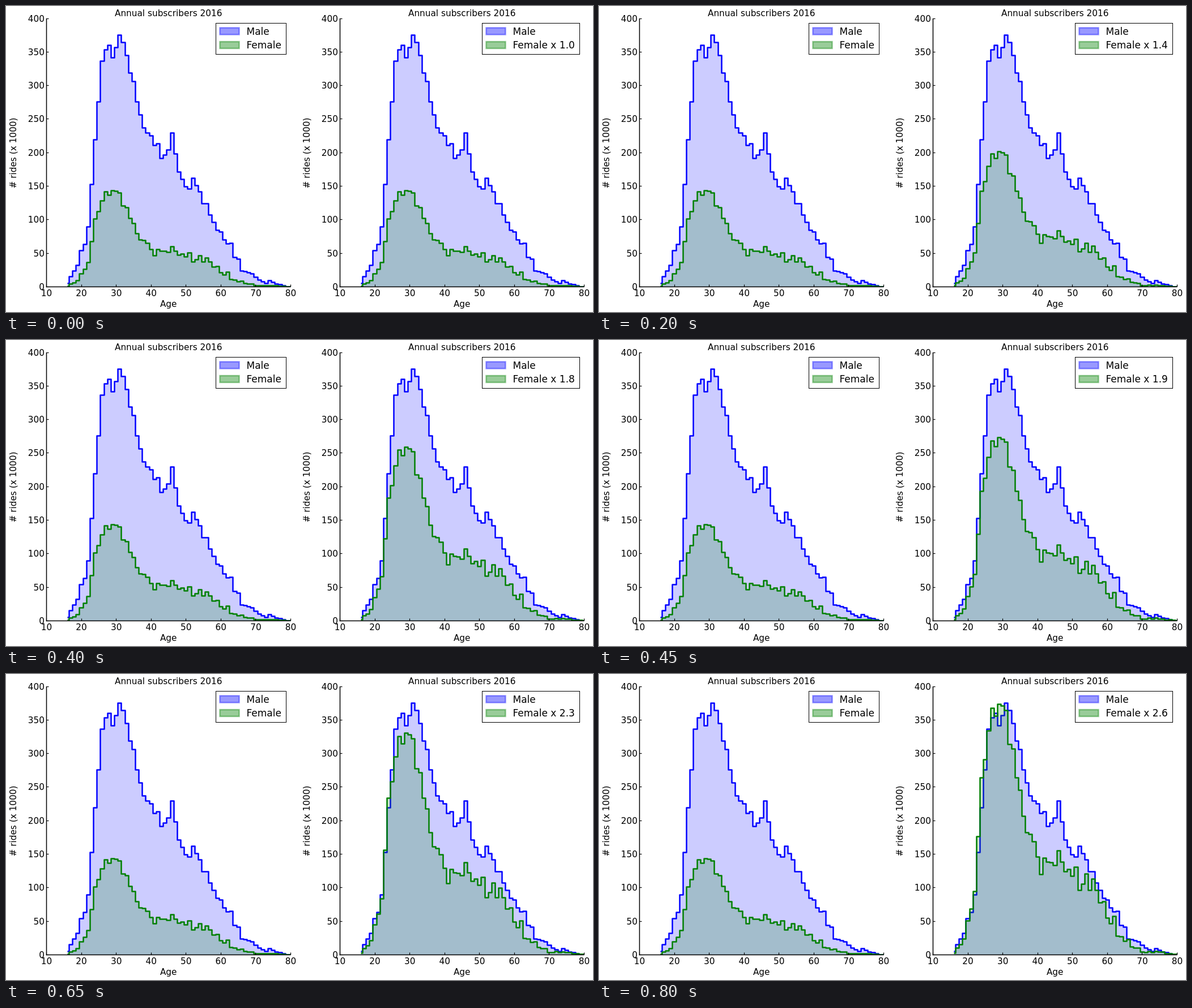
These frames come from a looping animation (1036x541 px, 0.85 s). An HTML page with a canvas:

```html
<!DOCTYPE html>
<html lang="en">
<head>
<meta charset="utf-8">
<title>Annual subscribers</title>
<style>
  html, body { margin: 0; width: 100%; height: 100%; overflow: hidden; background: #fff; }
  canvas { display: block; }
</style>
</head>
<body>
<canvas id="stage" width="1036" height="541"></canvas>
<script>
const ctx = document.getElementById('stage').getContext('2d');

// Thousands of rides per year of age, starting at FIRST_AGE
const FIRST_AGE = 16;
const male = [
  5, 15, 24, 32, 54, 63, 89, 153, 219, 276, 336, 353, 360, 341, 357, 375, 364.5, 344.5, 319, 306,
  276, 256, 237, 229, 225, 211, 213, 191, 196, 204, 229, 198, 171, 160, 149, 146, 161.5, 151, 142,
  123.5, 123.5, 107, 96.5, 84, 81.5, 70, 64, 65, 44, 41, 24, 22.5, 21, 19, 14, 10, 7.5, 5, 9, 6.5,
  4, 3, 2, 0.3, 0.3];
const female = [
  1.1, 4, 5.8, 9.2, 19.3, 26.4, 36.4, 67.7, 101.5, 112, 128.4, 141.3, 136.8, 143.7, 142.5, 140,
  120.6, 118, 101.6, 94.4, 79.3, 70, 69, 65, 56, 46.2, 55.3, 53.3, 52.8, 51.2, 59.6, 53.3, 47.5,
  49, 45, 50.3, 37.1, 40.4, 46.5, 37, 43.3, 37, 29.7, 30.6, 21.2, 17.7, 22, 10.6, 10.4, 7.9, 8.6,
  4.7, 4, 3.9, 1.5, 1.4, 2.1, 1.3, 2, 1.5, 1.5, 0.6, 0.7, 0.3, 0.2];

const BLUE = '0,0,255', GREEN = '0,128,0';
const LEFT = 71.5, RIGHT = 502.5, TOP = 22, BOTTOM = 496.5;
const STEP_MS = 50, STEPS = 17;

const ageX = age => LEFT + (age - 10) * (RIGHT - LEFT) / 70;
const ridesY = rides => BOTTOM - rides * (BOTTOM - TOP) / 400;
const snap = v => Math.floor(v) + 0.5;

function text(string, x, y, size = 15.3, align = 'center') {
  ctx.font = `${size}px "DejaVu Sans", sans-serif`;
  ctx.textAlign = align;
  ctx.fillStyle = '#000';
  ctx.fillText(string, x, y);
}

function line(x1, y1, x2, y2, width) {
  ctx.lineWidth = width;
  ctx.strokeStyle = '#000';
  ctx.beginPath();
  ctx.moveTo(x1, y1);
  ctx.lineTo(x2, y2);
  ctx.stroke();
}

// Each value spans half a year on either side of its age
function drawSeries(values, factor, rgb) {
  const outline = new Path2D(), area = new Path2D();
  const start = snap(ageX(FIRST_AGE));
  area.moveTo(start, BOTTOM);
  values.forEach((value, i) => {
    const age = FIRST_AGE + i;
    const y = snap(ridesY(value * factor));
    const from = i ? snap(ageX(age - 0.5)) : start;
    const to = snap(ageX(Math.min(age + 0.5, 80)));
    if (i) outline.lineTo(from, y); else outline.moveTo(from, y);
    outline.lineTo(to, y);
    area.lineTo(from, y);
    area.lineTo(to, y);
  });
  area.lineTo(RIGHT, BOTTOM);
  ctx.fillStyle = `rgba(${rgb},0.2)`;
  ctx.fill(area);
  ctx.strokeStyle = `rgb(${rgb})`;
  ctx.lineWidth = 2.5;
  ctx.lineJoin = 'round';
  ctx.stroke(outline);
}

function drawAxes() {
  line(LEFT, TOP, LEFT, BOTTOM + 0.75, 1.5);
  line(LEFT - 0.75, BOTTOM, RIGHT, BOTTOM, 1.5);
  for (let age = 10; age <= 80; age += 10) {
    const x = snap(ageX(age));
    line(x, BOTTOM, x, BOTTOM - 4, 1.2);
    text(age, ageX(age), 512.5);
  }
  for (let rides = 0; rides <= 400; rides += 50) {
    const y = snap(ridesY(rides));
    line(LEFT, y, LEFT + 4, y, 1.2);
    text(rides, LEFT - 3.5, y + 5, 15.3, 'right');
  }
  text('Annual subscribers 2016', 286.7, 18);
  text('Age', 286.7, 532);
  ctx.save();
  ctx.translate(18, 260);
  ctx.rotate(-Math.PI / 2);
  text('# rides (x 1000)', 0, 0);
  ctx.restore();
}

function drawLegend(x, femaleLabel) {
  ctx.fillStyle = '#fff';
  ctx.fillRect(x, 30.5, 494.5 - x, 55);
  ctx.strokeStyle = '#000';
  ctx.lineWidth = 1;
  ctx.strokeRect(x, 30.5, 494.5 - x, 55);
  [['Male', BLUE, 38.5], [femaleLabel, GREEN, 63]].forEach(([label, rgb, y]) => {
    ctx.fillStyle = ctx.strokeStyle = `rgba(${rgb},0.4)`;
    ctx.lineWidth = 2.5;
    ctx.lineJoin = 'miter';
    ctx.fillRect(x + 7, y, 34, 12);
    ctx.strokeRect(x + 7, y, 34, 12);
    text(label, x + 54, y + 12, 17, 'left');
  });
}

function drawChart(offset, factor, legendX, femaleLabel) {
  ctx.save();
  ctx.translate(offset, 0);
  ctx.save();
  ctx.beginPath();
  ctx.rect(LEFT, TOP, RIGHT - LEFT, BOTTOM - TOP);
  ctx.clip();
  drawSeries(male, 1, BLUE);
  drawSeries(female, factor, GREEN);
  ctx.restore();
  drawAxes();
  drawLegend(legendX, femaleLabel);
  ctx.restore();
}

function draw(now) {
  const factor = 1 + Math.floor(now / STEP_MS) % STEPS / 10;
  ctx.fillStyle = '#fff';
  ctx.fillRect(0, 0, 1036, 541);
  drawChart(0, 1, 370.5, 'Female');
  drawChart(518, factor, 322.5, `Female x ${factor.toFixed(1)}`);
  requestAnimationFrame(draw);
}
draw(0);
</script>
</body>
</html>
```
